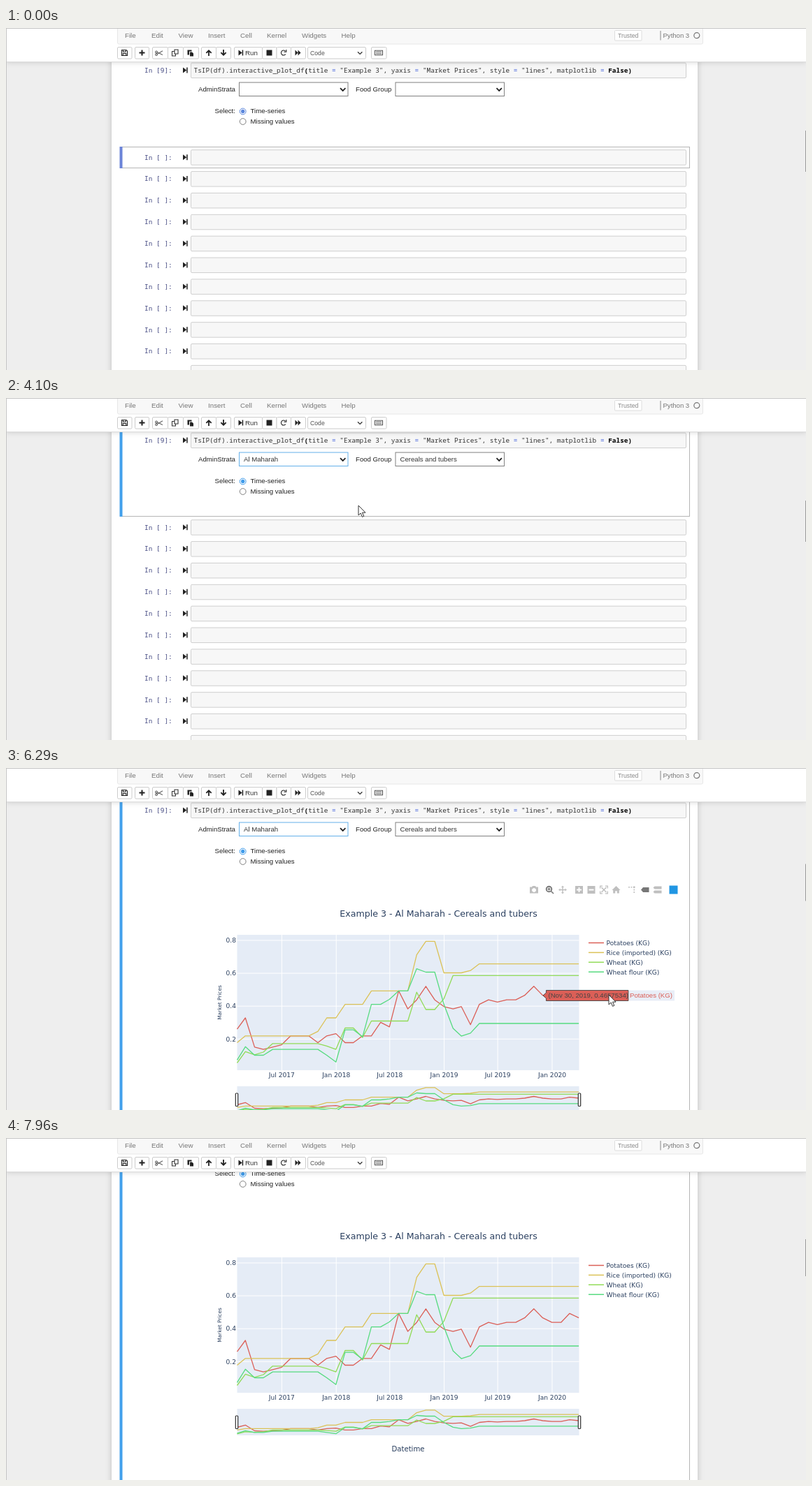
These frames come from a looping animation (1144x490 px, 8 s). An HTML page:

```html
<!DOCTYPE html>
<html lang="en">
<head>
<meta charset="utf-8">
<title>Notebook plot</title>
<style>
html, body { margin: 0; width: 1144px; height: 490px; overflow: hidden; background: #eee; }
svg { display: block; font-family: "Liberation Sans", Arial, sans-serif; }
.dv { font-family: "DejaVu Sans", Verdana, sans-serif; }
.mono { font-family: "Noto Sans Mono", "DejaVu Sans Mono", monospace; }
.prompt { font-family: "DejaVu Sans Mono", monospace; }
.shadow { filter: drop-shadow(0 0 4.5px rgba(87, 87, 87, .32)); }
</style>
</head>
<body>
<svg id="stage" width="1144" height="490" viewBox="0 0 1144 490"></svg>
<script>
const LOOP = 8000, INK = '#2a3f5f', ROW = 29.4, LIST_TOP = 97.5;

// ---- markup helpers (text y is the vertical centre) ----
const text = (x, y, s, size = 9.65, fill = '#222', more = '') =>
  `<text x="${x}" y="${y + size * .36}" font-size="${size}" fill="${fill}" ${more}>${s}</text>`;
const rect = (x, y, w, h, fill, stroke = 'none', more = '') =>
  `<rect x="${x}" y="${y}" width="${w}" height="${h}" fill="${fill}" stroke="${stroke}" ${more}/>`;
const path = (d, fill = 'none', stroke = 'none', more = '') =>
  `<path d="${d}" fill="${fill}" stroke="${stroke}" ${more}/>`;
const at = (x, y, s) => `<g transform="translate(${x} ${y})">${s}</g>`;
const group = (id, s) => `<g id="${id}">${s}</g>`;
const mid = 'text-anchor="middle"';

// ---- notebook ----
const runMark = path('M-3-4L2.2 0L-3 4zM2.2-4h1.5v8h-1.5z', '#222');
const prompt = (y, n) =>
  text(198, y, `In [${n}]:`, 9.45, '#4a4f86', 'class="prompt"') + at(256, y, runMark);
const cell = (y, n) =>
  prompt(y, n) + rect(264.5, y - 10.5, 708, 21.5, '#f7f7f7', '#cfcfcf', 'rx="1.5"');
const select = (x, id) => rect(x + .5, 78, 155.5, 19.5, '#fff', '#808080', `id="${id}Box"`) +
  text(x + 7, 88, '', 9.65, '#333', `id="${id}"`) +
  path(`M${x + 145} 86.2l3.7 3.7 3.7-3.7`, 'none', '#222', 'stroke-width="1.8"');
const op = '<tspan fill="#3b5bdb">=</tspan>';
const bold = s => `<tspan fill="#000" font-weight="bold">${s}</tspan>`;
const code = `TsIP(df).interactive_plot_df${bold('(')}title ${op} "Example 3", yaxis ${op} ` +
  `"Market Prices", style ${op} "lines", matplotlib ${op} ${bold('False)')}`;

const firstCell = cell(60.5, 9) + text(268.5, 60.5, code, 9.42, '#333', 'class="mono"') +
  text(275, 88, 'AdminStrata') + select(333, 'admin') +
  text(500, 88, 'Food Group') + select(556.5, 'food') +
  text(298.5, 119, 'Select:') + text(349.5, 119, 'Time-series') + text(349.5, 134, 'Missing values') +
  `<g id="radio"><circle cx="338.7" cy="119.5" r="4.4" fill="#fff" stroke="currentColor"/>
   <circle cx="338.7" cy="119.5" r="2.7" fill="currentColor"/></g>
   <circle cx="338.7" cy="134" r="4.4" fill="#fff" stroke="#808080"/>`;
const emptyCells = Array.from({ length: 11 }, (_, i) => cell(185.2 + i * 30.87, ' ')).join('');
const frame = (y, h, color) =>
  rect(163.5, y, 814, h, 'none', '#b5b5b5') + rect(162.5, y - .5, 4, h + 1, color);

// ---- chart: prices in 1/73 units, "v*n" repeats a value ----
const expand = s => s.split(' ').flatMap(p => {
  const [v, n = 1] = p.split('*').map(Number);
  return Array(n).fill(v);
});
const series = [
  ['Potatoes (KG)', '#db5f57', '19 24 11 10 11 12 16*3 13 16 17 13*2 16*2 22 20 36 28 32 38 32 29 28 29 21 30 32 31 32*2 34 38 34 32*2 36 34'],
  ['Rice (imported) (KG)', '#dbc257', '13 16*8 18 24*2 30*3 36*5 52 58*2 44*3 45 48*12'],
  ['Wheat (KG)', '#91db57', '4 9 7.6 8.8 12.6*6 11.5 10 19.5*2 15.3 22.6*5 35.4 27.7*2 32.5 42.8*15'],
  ['Wheat flour (KG)', '#57db80', '5.3 11.2 7.4*2 10*6 7.4 4.4 18.7*2 15.6 30*2 32.2 36*2 45.8 44.3*2 30 19.3 15.9 17.2 21.5*12']
].map(([name, color, s]) => ({ name, color, data: expand(s) }));
const monthEnd = i => Date.UTC(2017, i + 1, 0);
const dateX = ms => 330.5 + .423 * (ms - monthEnd(0)) / 864e5;
const priceY = v => 435.4 - 235.5 * v;
const sliderY = y => 456 + (y - 239) * 38 / 194;
const curve = (s, fy) => path('M' + s.data.map((v, i) =>
  `${dateX(monthEnd(i)).toFixed(1)} ${fy(priceY(v / 73)).toFixed(1)}`).join('L'),
  'none', s.color, 'stroke-width="1.3" stroke-linejoin="round"');
const handle = x => rect(x - 1.7, 466, 3.4, 18.5, '#fff', '#333', 'rx="1" stroke-width="1.2"');

const grid = [.2, .4, .6, .8].map(v => path(`M330.5 ${priceY(v)}H819.5`, 'none', '#fff') +
    text(329, priceY(v), v, 9.05, INK, 'class="dv" text-anchor="end"')).join('') +
  [6, 12, 18, 24, 30, 36].map(m => {
    const x = dateX(Date.UTC(2017, m, 1));
    const label = `${m % 12 ? 'Jul' : 'Jan'} ${2017 + Math.floor(m / 12)}`;
    return path(`M${x} 239V433`, 'none', '#fff') + text(x, 439.5, label, 9.1, INK, `class="dv" ${mid}`);
  }).join('');

const box = 'M-5.5-5.5h11v11h-11z';
const icons = [
  [755, 'M-6-4h3l1-1.5h4l1 1.5h3v9h-12zM0-2.5a3 3 0 1 0 .1 0z'],
  [796, 'M0-6l2 2.5h-1.3v2.8h2.8V-2L6 0 3.5 2V.7H.7v2.8H2L0 6-2 3.5h1.3V.7h-2.8V2L-6 0l2.5-2v1.3h2.8v-2.8H-2z'],
  [819.5, box + 'M-.9-3.5v2.6h-2.6v1.8h2.6v2.6h1.8v-2.6h2.6v-1.8h-2.6v-2.6z'],
  [837, box + 'M-3.5-.9h7v1.8h-7z'],
  [855, 'M-6-6h4v1.3h-2.7V-2H-6zM6-6v4H4.7v-2.7H2V-6zM-6 6V2h1.3v2.7H-2V6zM6 6H2V4.7h2.7V2H6zM-4-3l1-1 3 3 3-3 1 1-3 3 3 3-1 1-3-3-3 3-1-1 3-3z'],
  [872.5, 'M0-5.5L6 .5H4.3V5H1.3V1.8h-2.6V5h-3V.5H-6z'],
  [895, 'M-5-4.5h2v1.5h-2zM-1.5-4.5h2v1.5h-2zM2-5h2.5v2.5H2zM2.5-1h1.5v2h-1.5zM2.5 2.5h1.5v2h-1.5z'],
  [931.5, 'M-6-3l2-2H6v4H-4zM-6 3l2-2H6v4H-4z']
].map(([x, d]) => at(x, 174.5, path(d, '#bfbfbf', 'none', 'fill-rule="evenodd"'))).join('') +
  at(777.5, 174.5, `<circle cx="-1" cy="-1" r="3.8" fill="none" stroke="#777" stroke-width="1.9"/>` +
    path('M2 2l3.5 3.5M-3-1h4M-1-3v4', 'none', '#777', 'stroke-width="1.5"')) +
  at(914, 174.5, path('M-6 0l3-3.5H5.5v7H-3z', '#777')) +
  rect(948.5, 168.5, 12, 12, '#2196e3');

const chart =
  text(618.5, 208.5, 'Example 3 - Al Maharah - Cereals and tubers', 12.62, INK, `class="dv" ${mid}`) +
  rect(330.5, 239, 489, 194, '#e5ecf6') + grid + series.map(s => curve(s, y => y)).join('') +
  `<g transform="translate(305.5 336) rotate(-90)">${text(0, 0, 'Market Prices', 7.4, INK, `class="dv" ${mid}`)}</g>` +
  series.map((s, i) => path(`M833 ${250.5 + i * 13.9}h22`, 'none', s.color, 'stroke-width="1.5"') +
    text(858.5, 250.7 + i * 13.9, s.name, 9.05, INK, 'class="dv"')).join('') +
  rect(330.5, 456, 489, 38, '#e5ecf6') + series.map(s => curve(s, sliderY)).join('') +
  handle(330) + handle(820) +
  text(575, 513, 'Datetime', 10.15, INK, `class="dv" ${mid}`) + group('modebar', icons) +
  group('tip', path('M0 0l4.5-4V-7.5h117.5v15H4.5V4z', '#db5f57', '#444', 'stroke-width=".9"') +
    text(7.5, 0, '', 9.65, '#444', 'id="tipText"') + rect(123, -7.5, 65, 15, '#e9eef7') +
    text(124, 0, 'Potatoes (KG)', 9.65, '#db5f57'));

// ---- dropdown list ----
const places = ['Abyan', 'Aden', 'Al Bayda', "Al Dhale'e", 'Al Hudaydah', 'Al Jawf', 'Al Maharah',
  'Al Mahwit', 'Amanat Al Asimah', 'Amran', 'Dhamar', 'Hadramaut', 'Hajjah'];
const list = rect(333.5, 97.5, 155.5, 410, '#fff', '#777') +
  rect(334, 0, 139.5, ROW, '#1e90ff', 'none', 'id="hover"') +
  places.map((p, i) => text(340, 111.7 + i * ROW, p, 9.65, '#333', 'class="place"')).join('') +
  rect(474, 98, 14.5, 400, '#f1f1f1') + rect(474.5, 113, 12.5, 238, '#c1c1c1') +
  path('M477 107.5l3.7-4 3.7 4z', '#888') + path('M477 487l3.7 4 3.7-4z', '#333');

// ---- header ----
const menu = [[170, 'File'], [208, 'Edit'], [246.5, 'View'], [289, 'Insert'], [335, 'Cell'],
  [373, 'Kernel'], [423, 'Widgets'], [479.5, 'Help']].map(([x, s]) => text(x, 10.7, s, 9.75, '#777')).join('');
const button = (x, w) => rect(x + .5, 27.5, w, 16.5, '#fff', '#ccc', 'rx="1.5"');
const glyph = (x, d, fill = '#222', stroke = 'none') =>
  at(x, 35.5, path(d, fill, stroke, 'stroke-width="1.1" fill-rule="evenodd"'));
const arrowUp = 'M0-4.5l4.3 4.3-1.3 1.3-2.1-2.1v5.5h-1.8v-5.5l-2.1 2.1-1.3-1.3z';
const toolbar = [[159, 20.5], [184, 20], [209, 22], [231, 22], [253, 22], [279, 21], [300, 21],
  [326, 40], [366, 20.5], [386.5, 20.5], [407, 21], [431, 83], [522, 21.5]].map(b => button(...b)).join('') +
  glyph(169.5, 'M-4-4h6.5l1.5 1.5v6.5h-8zM-2-4v2.8h3.5V-4M-2.2 4V1h4.4v3', 'none', '#222') +
  glyph(194.5, 'M-1-4h2v3h3v2h-3v3h-2v-3h-3v-2h3z') +
  glyph(219.5, 'M-4.5-2.5a1.4 1.4 0 1 0 .1 0zM-4.5 1.2a1.4 1.4 0 1 0 .1 0zM-3-.7l7.5 3.8M-3 1.8l7.5-4.6', 'none', '#666') +
  glyph(242, 'M-1-4.5h5v6h-5zM-1-2h-3.5v6.5h5v-3', 'none', '#333') +
  glyph(264, 'M-4.5-4h6v2h-3.5v5h-2.5zM-1-1h3l2 2v4h-5z', '#222') +
  glyph(290, arrowUp) + `<g transform="translate(311 35.5) scale(1 -1)">${path(arrowUp, '#222')}</g>` +
  at(335.5, 35.5, runMark) + text(342, 35.5, 'Run', 9.75, '#333') +
  glyph(376.5, 'M-4-4h8v8h-8z') +
  glyph(397, 'M2.8 2a3.5 3.5 0 1 1-.3-4.4M3.8-4.5v3.3H.5', 'none', '#222') +
  glyph(417.5, 'M-4-4L0 0l-4 4zM0-4L4 0 0 4z') +
  text(435, 36, 'Code', 8.7, '#555') + path('M503 34.2l3.2 3.2 3.2-3.2', 'none', '#333', 'stroke-width="1.3"') +
  glyph(533, 'M-5.5-3.2h11v6.5h-11zM-4-1.2h8M-4 1.2h8', 'none', '#555');
const header = rect(0, -10, 1144, 58, '#fff', 'none', 'class="shadow"') +
  path('M0 48.5H1144', 'none', '#ddd') +
  rect(159.5, -3.5, 837, 26.5, '#f8f8f8', '#e7e7e7', 'rx="2"') + menu +
  rect(870.5, 3.5, 38.5, 14.5, '#fff', '#ddd', 'rx="1"') + text(889.7, 10.7, 'Trusted', 8.8, '#888', mid) +
  path('M936 4V17.5', 'none', '#888') + text(939.5, 10.7, 'Python 3', 9.55, '#777') +
  `<circle id="busy" cx="987.8" cy="10.7" r="4" stroke="#777" stroke-width="1.2"/>` + toolbar;

const pointer = path('M0 0V14l3.2-3 2.3 5.4 2.3-1-2.3-5.2H10z', '#fff', '#333');
const resize = path('M-10 0l5-5v3.2H5V-5l5 5-5 5V1.8H-5V5z', '#fff', '#333');

document.getElementById('stage').innerHTML =
  rect(0, 0, 1144, 490, '#eee') +
  rect(151, -20, 838, 530, '#fff', 'none', 'class="shadow"') +
  group('page', group('idleFrame', frame(170.5, 30, '#6b83d8')) +
    group('cells', emptyCells) + group('shortFrame', frame(20.5, 149, '#42a0ec')) +
    group('longFrame', frame(20.5, 700, '#42a0ec')) + firstCell +
    group('chart', chart) + group('list', list)) +
  header + path('M0 .5H1144M.5 0V490', 'none', '#c4c4c4') +
  rect(1143, 0, 1, 55, '#999', 'none', 'id="thumb"') +
  group('pointer', pointer) + group('resize', resize);

// ---- motion ----
const moves = [[150, 920, 11], [1000, 1150, 3], [1710, 2480, 11], [2560, 2800, 4], [3260, 3880, 9],
  [4100, 4190, 2], [4820, 5580, 11], [5670, 6450, 11], [6520, 6840, 5], [7580, 7960, 6]];
const cursorKeys = [[150, 999, 480], [535, 640, 240], [765, 338, 125], [920, 390, 94], [1150, 392, 88],
  [1900, 392, 88], [2480, 388, 222], [2560, 388, 232], [2800, 384, 291], [3260, 384, 291],
  [3880, 504, 154], [4190, 504, 154], [4820, 500, 165], [5124, 362, 345], [5352, 490, 370],
  [5504, 587, 319], [5670, 606, 322], [6060, 745, 325], [6294, 862, 325], [6450, 1046, 330], [6840, 1131, 340]];
const tipKeys = [[5048, 3], [5124, 2], [5352, 13], [5504, 21], [5670, 22], [6294, 34], [6450, 38]];
const scrollKeys = [[7504, 0], [7580, 4], [7732, 21.5], [7960, 68]];

// The screen refreshes in even steps inside each move and rests between them.
function snap(t) {
  let s = 0;
  for (const [a, b, n] of moves) {
    const d = (b - a) / (n - 1);
    if (t >= a) s = Math.min(b, a + Math.floor((t - a) / d + .1) * d);
  }
  return s;
}
function track(keys, t) {
  const j = keys.findIndex(k => k[0] > t);
  if (j === 0) return keys[0].slice(1);
  if (j < 0) return keys[keys.length - 1].slice(1);
  const a = keys[j - 1], b = keys[j], u = (t - a[0]) / (b[0] - a[0]);
  return a.slice(1).map((v, i) => v + (b[i + 1] - v) * u);
}
const $ = id => document.getElementById(id);
const show = (id, on) => { $(id).style.display = on ? '' : 'none'; };
const move = (id, x, y) => $(id).setAttribute('transform', `translate(${x} ${y})`);
const placeNodes = document.querySelectorAll('.place');

function render(t) {
  const s = snap(t), active = s >= 1710, plotted = s >= 4190;
  show('idleFrame', !active);
  show('shortFrame', active && !plotted);
  show('longFrame', plotted);
  show('cells', !plotted);
  show('chart', plotted);
  $('adminBox').setAttribute('stroke', active ? '#64b0ea' : '#808080');
  $('radio').style.color = active ? '#3f9bea' : '#5a86dc';
  $('admin').textContent = s >= 3260 ? 'Al Maharah' : '';
  $('food').textContent = s >= 3330 ? 'Cereals and tubers' : '';
  $('busy').setAttribute('fill', s >= 3330 && s < 4100 ? '#777' : 'none');

  const [x, y] = track(cursorKeys, s);
  const inPlot = plotted && x > 330 && x < 820 && y > 239 && y < 433;
  const visible = s >= 150 && s < 6840;
  show('pointer', visible && !inPlot);
  show('resize', visible && inPlot);
  move('pointer', x, y);
  move('resize', x, y);

  const row = Math.floor((y - LIST_TOP) / ROW);
  show('list', s > 1750 && s < 3260);
  show('hover', row >= 0);
  $('hover').setAttribute('y', LIST_TOP + row * ROW);
  placeNodes.forEach((n, i) => n.setAttribute('fill', i === row ? '#fff' : '#333'));

  show('modebar', s >= 4890 && s < 6840);
  show('tip', s >= 5040 && s < 6520);
  const i = Math.round(track(tipKeys, s)[0]), price = series[0].data[i] / 73;
  move('tip', dateX(monthEnd(i)) + .5, priceY(price) + .3);
  const day = new Date(monthEnd(i)).toLocaleDateString('en-US',
    { month: 'short', day: 'numeric', year: 'numeric', timeZone: 'UTC' });
  $('tipText').textContent = `(${day}, ${price.toFixed(7)})`;

  const scroll = track(scrollKeys, s)[0];
  move('page', 0, -scroll);
  $('thumb').setAttribute('y', plotted ? 137.5 + scroll * .11 : 147);
  $('thumb').setAttribute('height', plotted ? 53 : 59);
}
function tick() {
  render(performance.now() % LOOP);
  requestAnimationFrame(tick);
}
tick();
</script>
</body>
</html>
```
